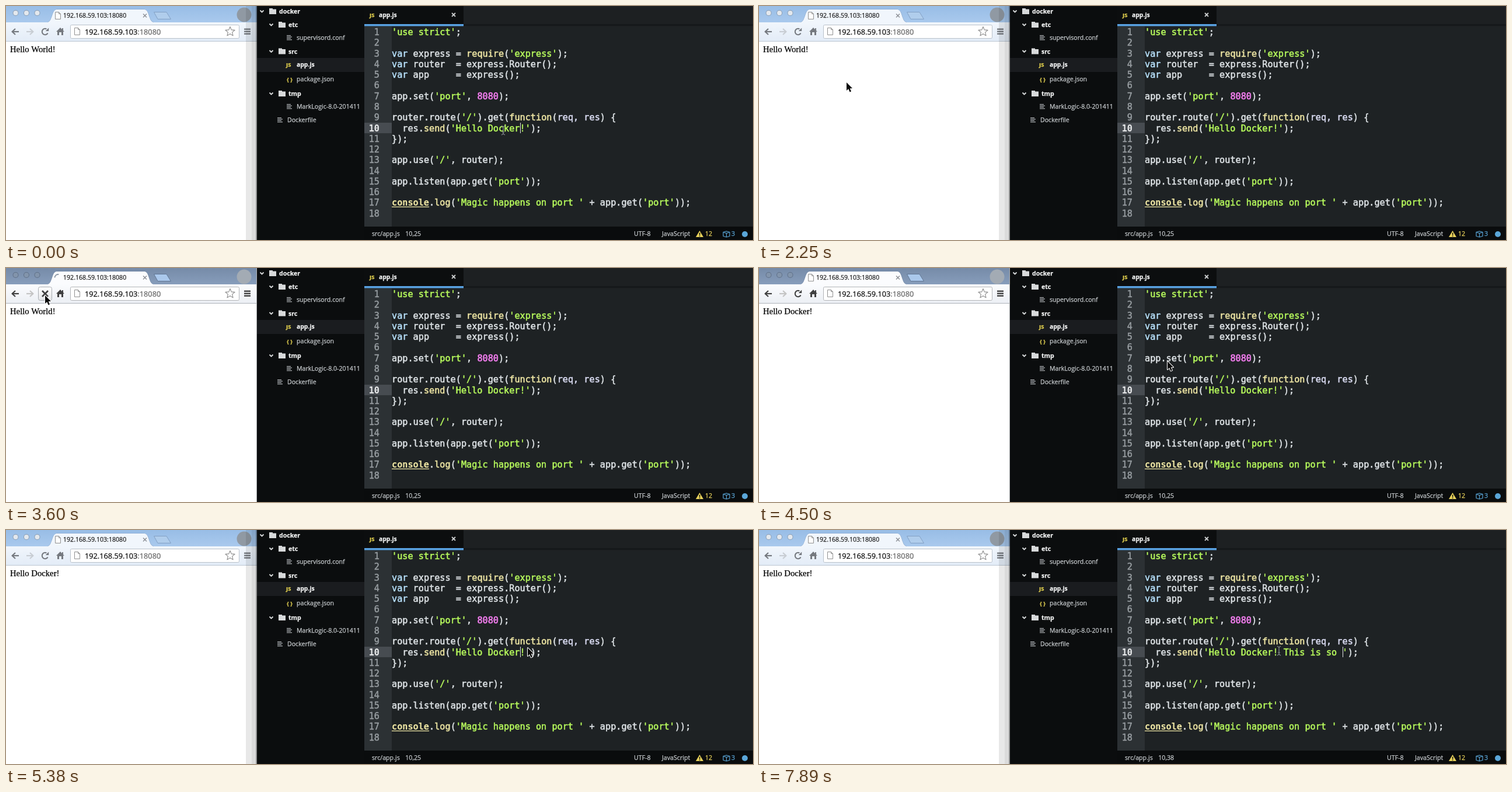
Write an HTML page with a canvas that moves like this. It is 1280 px wide and 401 px high and loops after 8 s.

```html
<!DOCTYPE html>
<html lang="en">
<head>
<meta charset="utf-8">
<title>Live reload demo</title>
<style>
  html, body { margin: 0; width: 100%; height: 100%; overflow: hidden; background: #0b0d0e; }
  canvas { display: block; width: 1280px; height: 401px; }
</style>
</head>
<body>
<canvas id="stage" width="1280" height="401"></canvas>
<script>
const ctx = document.getElementById('stage').getContext('2d');
const LOOP = 8000;
const SANS = '"Open Sans", sans-serif';
const MONO = '"DejaVu Sans Mono", monospace';
const CODE_X = 661, CHAR = 9.15, ROW = 18.28, ROW_TOP = 35.5, BASELINE = 14.5;

const rowTop = n => ROW_TOP + (n - 1) * ROW;

// Latest entry [time, ...values] that has started
const at = (keys, t) => keys.filter(k => k[0] <= t).pop();

const MOUSE = [
  [0, 852, 213, 'beam'], [1650, 560, 222, 'arrow'], [1800, 251, 237, 'arrow'],
  [2100, 172, 160, 'arrow'], [2250, 150, 131, 'arrow'], [2700, 146, 124, 'arrow'],
  [2850, 122, 96, 'arrow'], [3000, 92, 66, 'arrow'], [3150, 71, 50, 'arrow'],
  [3300, 67, 47, 'arrow'], [4350, 250, 90, 'arrow'], [4500, 700, 160, 'arrow'],
  [4640, 902, 183, 'arrow'], [4940, 899, 190, 'arrow'], [5090, 894, 202, 'arrow'],
  [5970, 891, 207, 'beam']
];
const CARET = [
  [0, true], [450, false], [900, true], [1350, false], [1800, true], [2250, false],
  [5380, true], [5680, false], [6120, true], [6720, false], [6870, true]
];
const TYPED = [
  [0, 0], [6870, 1], [7010, 3], [7160, 5], [7310, 6], [7450, 8], [7600, 9], [7740, 11], [7890, 12]
];
const ADDED = ' This is so ';

function rect(x, y, w, h, color) {
  ctx.fillStyle = color;
  ctx.fillRect(x, y, w, h);
}

// A thin stroke gives the slightly heavy look of smoothed screen text
function text(str, x, y, color, font, { align = 'left', heavy = 0.25 } = {}) {
  ctx.font = font;
  ctx.textAlign = align;
  ctx.fillStyle = ctx.strokeStyle = color;
  ctx.lineWidth = heavy;
  ctx.fillText(str, x, y);
  ctx.strokeText(str, x, y);
}

function trace(points, close) {
  ctx.beginPath();
  points.forEach(([x, y], i) => i ? ctx.lineTo(x, y) : ctx.moveTo(x, y));
  if (close) ctx.closePath();
}

function line(points, color, width = 1, close = false) {
  trace(points, close);
  ctx.strokeStyle = color;
  ctx.lineWidth = width;
  ctx.stroke();
}

function poly(points, color) {
  trace(points, true);
  ctx.fillStyle = color;
  ctx.fill();
}

function disc(x, y, r, color) {
  ctx.beginPath();
  ctx.arc(x, y, r, 0, Math.PI * 2);
  ctx.fillStyle = color;
  ctx.fill();
}

function arc(x, y, r, from, to, color, width) {
  ctx.beginPath();
  ctx.arc(x, y, r, from, to);
  ctx.strokeStyle = color;
  ctx.lineWidth = width;
  ctx.stroke();
}

function roundBox(x, y, w, h, r, fill, stroke) {
  ctx.beginPath();
  ctx.roundRect(x, y, w, h, r);
  ctx.fillStyle = fill;
  ctx.fill();
  ctx.strokeStyle = stroke;
  ctx.lineWidth = 1;
  ctx.stroke();
}

function fade(y0, y1, from, to) {
  const g = ctx.createLinearGradient(0, y0, 0, y1);
  g.addColorStop(0, from);
  g.addColorStop(1, to);
  return g;
}

function pageIcon(x, y) {
  const w = 9, h = 12;
  const shape = [[x, y], [x + w - 3, y], [x + w, y + 3], [x + w, y + h], [x, y + h]];
  poly(shape, '#fff');
  line(shape, '#909090', 1, true);
  line([[x + w - 3, y], [x + w - 3, y + 3], [x + w, y + 3]], '#909090');
}

function navArrow(x, y, dir, color) {
  line([[x - 6 * dir, y], [x + 5 * dir, y]], color, 2.2);
  line([[x, y - 5], [x + 5.5 * dir, y], [x, y + 5]], color, 2.2);
}

function star(x, y, r) {
  const points = Array.from({ length: 10 }, (_, i) => {
    const a = i * Math.PI / 5 - Math.PI / 2, d = i % 2 ? r * 0.45 : r;
    return [x + d * Math.cos(a), y + d * Math.sin(a)];
  });
  line(points, '#8a8a8a', 1.1, true);
}

function tabStrip(focused, loading, t) {
  rect(0, 0, 430, 28, focused ? fade(0, 28, '#768ba8', '#879dbb') : fade(0, 28, '#98bde6', '#a9c9ed'));
  for (const x of [16.5, 35, 53.5]) {
    disc(x, 12, 5, focused ? '#5f7088' : '#8a9db3');
    disc(x, 12, 4, focused ? '#8294ab' : '#e3e8ee');
  }

  ctx.beginPath();
  ctx.moveTo(71, 28);
  ctx.bezierCurveTo(80, 27, 78, 6, 87, 6);
  ctx.lineTo(237, 6);
  ctx.bezierCurveTo(246, 6, 244, 27, 253, 28);
  ctx.strokeStyle = 'rgba(60,85,120,.3)';
  ctx.lineWidth = 1;
  ctx.stroke();
  ctx.fillStyle = focused ? '#fbfcfe' : '#f1f6fc';
  ctx.fill();

  if (loading) {
    const a = Math.PI + (t - 3600) / 150 * 1.2;
    arc(89, 16.5, 5.5, a, a + 1.8, '#8c98a6', 1.8);
  } else {
    pageIcon(84.5, 10.5);
  }
  text('192.168.59.103:18080', 98, 20, '#222', `10.6px ${SANS}`);
  line([[235, 13.5], [241, 19.5]], '#8b8f94', 1.4);
  line([[241, 13.5], [235, 19.5]], '#8b8f94', 1.4);

  const plus = [[253.5, 10.5], [275, 10.5], [282.5, 22.5], [260, 22.5]];
  poly(plus, focused ? '#aac8ec' : '#b0cdec');
  line(plus, focused ? '#607693' : '#82a0c4', 1, true);
  disc(408, 15, 12.5, focused ? '#a3abb4' : '#9099a3');
}

function reloadButton(hover, stop, color) {
  if (hover) roundBox(55.5, 32.5, 23, 23, 3, fade(32, 56, '#fff', '#e4e5e7'), '#a9adb2');
  if (stop) {
    line([[62, 39], [72, 49]], color, 2.6);
    line([[72, 39], [62, 49]], color, 2.6);
    return;
  }
  arc(67, 44, 5.2, 0.5, 5.2, color, 2.1);
  poly([[73.2, 37.5], [73.2, 43], [67.7, 43]], color);
}

function browser(t) {
  const focused = t >= 2400 && t < 5380;
  const loading = t >= 3600 && t < 3900;
  const ink = focused ? '#404040' : '#75797f';
  tabStrip(focused, loading, t);

  rect(0, 28, 430, 32, focused ? fade(28, 60, '#fbfcfe', '#eceff4') : fade(28, 60, '#f1f6fc', '#e3ecf7'));
  rect(0, 60, 430, 1, focused ? '#aeb3ba' : '#bcc6d2');
  navArrow(16, 44, -1, ink);
  navArrow(41, 44, 1, focused ? '#c4c4c4' : '#c8cdd3');
  reloadButton(t >= 3150 && t < 4350, t >= 3600 && t < 4350, ink);
  poly([[93, 37], [100, 44], [98, 44], [98, 50], [95, 50], [95, 45], [91, 45], [91, 50], [88, 50], [88, 44], [86, 44]], ink);
  rect(96, 38, 2, 4, ink);

  roundBox(110.5, 32.5, 289, 23, 2, '#fff', focused ? '#b2b4b7' : '#b9c1ca');
  pageIcon(117.5, 37.5);
  const urlFont = `12.75px ${SANS}`;
  text('192.168.59.103', 135, 48.5, '#111', urlFont);
  const hostWidth = ctx.measureText('192.168.59.103').width;
  text(':18080', 135 + hostWidth, 48.5, '#666', urlFont);
  star(384, 44, 8.5);
  for (const y of [38.5, 42.5, 46.5]) rect(408, y, 11, 2.4, ink);

  rect(0, 61, 430, 340, '#fff');
  text(t < 3900 ? 'Hello World!' : 'Hello Docker!', 7, 79, '#000', '14.7px "Liberation Serif", serif');

  if (focused) {
    rect(429, 0, 1, 401, '#b4b6b8');
  } else {
    rect(411, 0, 10, 401, 'rgba(0,0,0,.09)');
    rect(421, 0, 7, 401, 'rgba(0,0,0,.14)');
    rect(428, 0, 2, 401, 'rgba(0,0,0,.4)');
  }
}

function folder(name, x, y) {
  line([[x - 32.5, y - 1.5], [x - 29.5, y + 1.5], [x - 26.5, y - 1.5]], '#d8dadb', 1.8);
  rect(x - 17, y - 5, 6, 3, '#d8dadb');
  rect(x - 17, y - 3.5, 12, 8.5, '#d8dadb');
  text(name, x, y + 4, '#f2f3f3', `bold 10.6px ${SANS}`);
}

function file(name, x, y) {
  [7, 9, 7, 9].forEach((w, i) => rect(x - 17, y - 4 + i * 2.4, w, 1.2, '#b0b4b7'));
  text(name, x, y + 4, '#c9cdd0', `10.6px ${SANS}`);
}

function sidebar() {
  rect(430, 0, 184, 401, '#0b0d0e');
  rect(430, 89, 184, 24, '#1a1c1f');
  folder('docker', 468, 9);
  folder('etc', 484, 32);
  folder('src', 484, 77.5);
  folder('tmp', 484, 150);
  file('supervisord.conf', 498, 54);
  file('MarkLogic-8.0-201411', 498, 172);
  file('Dockerfile', 482, 195);
  text('JS', 480, 104, '#e5d34f', `bold 9.5px ${SANS}`);
  text('app.js', 498, 104, '#f4f5f5', `bold 10.4px ${SANS}`);
  text('{ }', 481, 129, '#d9c84f', `bold 9.5px ${SANS}`);
  text('package.json', 498, 129, '#c9cdd0', `10.6px ${SANS}`);
}

const CODE = [
  "'use strict';", '',
  "var express = require('express');",
  'var router  = express.Router();',
  'var app     = express();', '',
  "app.set('port', 8080);", '',
  "router.route('/').get(function(req, res) {",
  "  res.send('Hello Docker!');",
  '});', '',
  "app.use('/', router);", '',
  "app.listen(app.get('port'));", '',
  "console.log('Magic happens on port ' + app.get('port'));", ''
];
const TOKEN = /'[^']*'|\b8080\b|\b(?:var|require|function|send|console|log)\b|req, res|[^\s\w']+|\w+/g;

function tokenColor(token) {
  if (token[0] === "'") return '#b6f95c';
  if (token === '8080') return '#f67ff2';
  if (token === 'var') return '#b5def8';
  if (token === 'req, res') return '#d8daf0';
  if (/^(require|function|send|console|log)$/.test(token)) return '#ebe3a2';
  return '#dde2e5';
}

function codeLine(str, n) {
  const y = rowTop(n) + BASELINE;
  for (const { 0: token, index } of str.matchAll(TOKEN)) {
    const x = CODE_X + index * CHAR;
    const color = tokenColor(token);
    const strong = token === 'console';
    text(token, x, y, color, `${strong ? 'bold ' : ''}15.2px ${MONO}`, { heavy: strong ? 0.1 : 0.55 });
    if (strong) rect(x, y + 1.2, token.length * CHAR, 1.3, color);
  }
}

function editorTab(modified) {
  rect(614, 0, 666, 35, '#1d2022');
  rect(784, 31, 496, 3, '#15181a');
  rect(614, 0, 170, 31, '#0c0e0f');
  rect(614, 31, 170, 3.5, '#59a2e2');
  text('JS', 623, 19, '#e5d34f', `bold 9.5px ${SANS}`);
  text('app.js', 639, 19, '#f4f5f5', `bold 10.4px ${SANS}`);
  if (modified) {
    arc(767, 15, 3, 0, Math.PI * 2, '#59a2e2', 2);
  } else {
    line([[764, 12], [770, 18]], '#c9cccd', 1.8);
    line([[770, 12], [764, 18]], '#c9cccd', 1.8);
  }
}

function statusBar(modified, column) {
  rect(614, 378, 666, 23, '#0a0c0d');
  const font = `10.65px ${SANS}`, color = '#c9cdd0';
  const path = modified ? 'src/app.js*' : 'src/app.js';
  text(path, 627, 394, color, font);
  text(`10,${column}`, 627 + ctx.measureText(path).width + 9.5, 394, color, font);
  text('UTF-8', 1076, 394, color, font);
  text('JavaScript', 1124, 394, color, font);

  poly([[1188.5, 385], [1195, 396], [1182, 396]], '#e9d35b');
  rect(1187.8, 388.5, 1.6, 4, '#0a0c0d');
  rect(1187.8, 393.5, 1.6, 1.4, '#0a0c0d');
  text('12', 1198, 394, '#e9d35b', font);

  const blue = '#5aa6d8';
  line([[1229, 387.5], [1234.5, 386], [1240, 387.5], [1240, 394.5], [1234.5, 396], [1229, 394.5]], blue, 1.2, true);
  line([[1229, 387.5], [1234.5, 389.5], [1240, 387.5]], blue, 1.2);
  line([[1234.5, 389.5], [1234.5, 396]], blue, 1.2);
  text('3', 1243, 394, blue, font);
  disc(1266, 391, 5, blue);
}

function editor(t) {
  const typed = at(TYPED, t)[1];
  const column = (t < 6120 ? 25 : 26) + typed;
  const modified = t >= 300 && t < 900;
  rect(614, 0, 666, 401, '#1e2224');
  rect(614, 34, 47, 344, '#2c3134');
  rect(614, 200, 47, 18, '#474c51');
  editorTab(modified);

  CODE.forEach((str, i) => {
    const n = i + 1, current = n === 10;
    text(n, 640, rowTop(n) + BASELINE, current ? '#e6e8e9' : '#979da1',
      `${current ? 'bold ' : ''}15.2px ${MONO}`, { align: 'right', heavy: current ? 0.1 : 0.5 });
    codeLine(current ? str.replace('!', '!' + ADDED.slice(0, typed)) : str, n);
  });
  if (at(CARET, t)[1]) {
    rect(Math.round(CODE_X + (column - 1) * CHAR), 200, 1, 18, '#e4e6e7');
  }
  statusBar(modified, column);
}

function mouse(t) {
  const [, x, y, kind] = at(MOUSE, t);
  ctx.save();
  ctx.translate(x, y);
  if (kind === 'arrow') {
    const shape = [[0, 0], [0, 14], [3.2, 11], [5.6, 16.4], [8, 15.3], [5.7, 10.2], [10, 10]];
    line(shape, '#fff', 2, true);
    poly(shape, '#0a0a0a');
  } else {
    const beam = '#858b8e';
    line([[0, -6], [0, 6]], beam, 1.3);
    line([[-3, -8], [0, -6], [3, -8]], beam, 1.2);
    line([[-3, 8], [0, 6], [3, 8]], beam, 1.2);
    line([[-2, 3], [2, 3]], beam, 1);
  }
  ctx.restore();
}

function draw(t) {
  editor(t);
  sidebar();
  browser(t);
  mouse(t);
}

ctx.lineJoin = 'round';
const start = performance.now();
function tick() {
  draw((performance.now() - start) % LOOP);
  requestAnimationFrame(tick);
}
tick();
</script>
</body>
</html>
```
